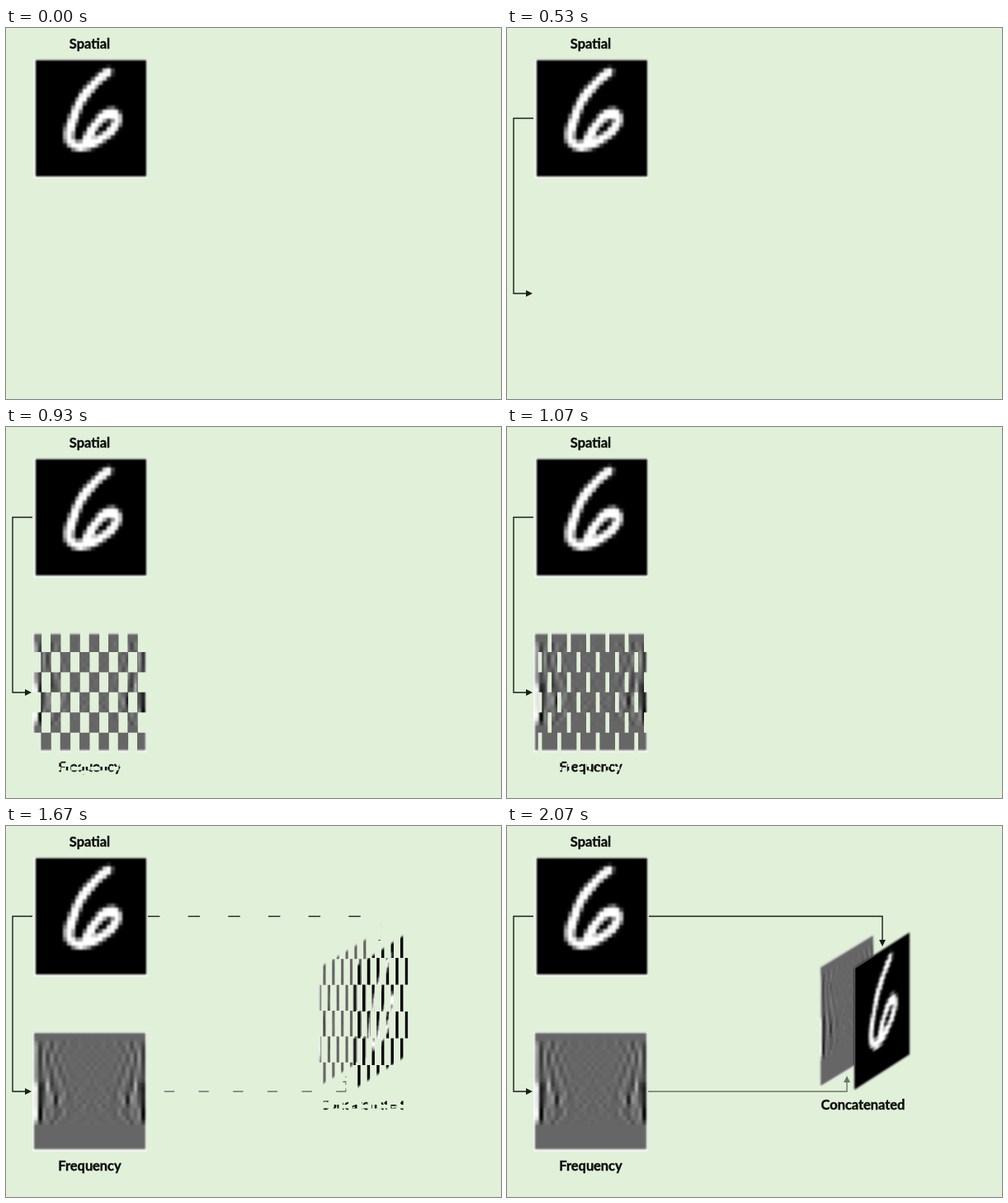
Recreate the animation shown at these times as an HTML page with a canvas. Size 600 px wide and 450 px high, loop 2540 ms.

```html
<!DOCTYPE html>
<html lang="en">
<head>
<meta charset="utf-8">
<title>Spatial and frequency channels</title>
<style>
  html, body { margin: 0; height: 100%; overflow: hidden; background: #e1f0d9; }
  canvas { display: block; width: 100vw; height: 100vh; filter: blur(0.6px); }
</style>
</head>
<body>
<canvas id="stage" width="600" height="450"></canvas>
<script>
const ctx = document.getElementById('stage').getContext('2d');
const LOOP = 2540, STEP = 1000 / 15, N = 28;
const DARK = '#1c1f1a', GREY = '#6c7569';

function makeTile() {
  const tile = document.createElement('canvas');
  tile.width = tile.height = N;
  return tile;
}

function makeDigit() {
  const tile = makeTile(), c = tile.getContext('2d');
  c.fillRect(0, 0, N, N);
  c.strokeStyle = '#fff';
  c.lineWidth = 2.3;
  c.lineCap = c.lineJoin = 'round';
  c.stroke(new Path2D('M18.3 2.9C14.5 5.5 11.5 9 10 13C8.2 17 7.6 19.8 9.8 20.5' +
    'C13 21.6 18.5 18.6 20.3 15.5C21.8 12.8 19 11.8 16.5 14C14 16.2 13.5 18 12.8 19.8'));
  return tile;
}

// Real part of the Fourier transform of each row of the digit.
function makeSpectrum(digit) {
  const tile = makeTile(), c = tile.getContext('2d');
  const input = digit.getContext('2d').getImageData(0, 0, N, N).data;
  const output = c.createImageData(N, N);
  for (let y = 0; y < N; y++) {
    for (let k = 0; k < N; k++) {
      let sum = 0;
      for (let x = 0; x < N; x++) {
        sum += input[(y * N + x) * 4] / 255 * Math.cos(2 * Math.PI * k * x / N);
      }
      const i = (y * N + k) * 4, level = 102 + 16 * sum;
      output.data.set([level, level, level, 255], i);
    }
  }
  c.putImageData(output, 0, 0);
  return tile;
}

const digit = makeDigit();
const spectrum = makeSpectrum(digit);

// A tile spanned by the edge (dx, dy) and a vertical edge of the given height.
function panel(tile, x, y, dx, dy, height, border) {
  ctx.save();
  ctx.transform(dx / 135, dy / 135, 0, height / 141, x, y);
  ctx.fillStyle = '#fafdf8';
  ctx.fillRect(-border, -border / 2, 135 + 1.75 * border, 141 + 1.75 * border);
  ctx.imageSmoothingEnabled = false;
  ctx.filter = 'blur(0.9px)';
  ctx.drawImage(tile, 0, 0, 135, 141);
  ctx.restore();
}

function label(text, x, y) {
  ctx.font = '700 16.4px Lato, sans-serif';
  ctx.textAlign = 'center';
  ctx.fillStyle = ctx.strokeStyle = '#0c0d0b';
  ctx.lineWidth = 0.4;
  ctx.fillText(text, x, y);
  ctx.strokeText(text, x, y);
}

// Elbow line whose last point is the tip of the arrowhead.
function arrow(points, color) {
  const [x, y] = points[points.length - 1];
  const [px, py] = points[points.length - 2];
  const length = Math.hypot(x - px, y - py);
  const ux = (x - px) / length, uy = (y - py) / length;
  const bx = x - 8 * ux, by = y - 8 * uy;
  ctx.strokeStyle = ctx.fillStyle = color;
  ctx.lineWidth = 1.4;
  ctx.beginPath();
  points.slice(0, -1).forEach(p => ctx.lineTo(...p));
  ctx.lineTo(bx, by);
  ctx.stroke();
  ctx.beginPath();
  ctx.moveTo(x, y);
  ctx.lineTo(bx - 4 * uy, by + 4 * ux);
  ctx.lineTo(bx + 4 * uy, by - 4 * ux);
  ctx.fill();
}

// Checkerboard reveal: six rows of six cells, each opening from left to right.
function reveal(progress, [x, y, width, height], draw) {
  if (progress <= 0) return;
  ctx.save();
  if (progress < 1) {
    const w = width / 6, h = height / 6;
    ctx.beginPath();
    for (let row = 0; row < 6; row++) {
      for (let col = -1; col < 6; col++) {
        ctx.rect(x + (col + row % 2 / 2) * w, y + row * h, progress * w, h);
      }
    }
    ctx.clip();
  }
  draw();
  ctx.restore();
}

// Start and length are in animation steps.
const groups = [
  { start: 1, length: 7, parts: [
    [[7, 108.5, 32, 222], () => arrow([[32, 109.5], [8, 109.5], [8, 322], [31, 322]], DARK)]
  ] },
  { start: 10, length: 7.5, parts: [
    [[30.7, 248.6, 140, 146.5], () => panel(spectrum, 34, 251, 135, 0, 141, 2)],
    [[31.5, 398.5, 140, 27], () => label('Frequency', 101.5, 418)]
  ] },
  { start: 22.78, length: 7.5, parts: [
    [[379, 130, 65, 188], () => panel(spectrum, 380, 171.5, 64, -39, 144, 1.5)],
    [[420.5, 127.5, 69, 195], () => panel(digit, 421, 172, 67, -43, 148, 0)],
    [[172, 108.4, 292, 45.6], () => arrow([[172, 109.5], [455, 109.5], [455, 146]], DARK)],
    [[171, 296, 250, 27], () => arrow([[171, 322], [412, 322], [412, 303]], GREY)],
    [[361.5, 324.5, 140, 27], () => label('Concatenated', 431.5, 344)]
  ] }
];

function render() {
  const step = Math.floor((performance.now() % LOOP + 3.4) / STEP);
  ctx.fillStyle = '#e1f0d9';
  ctx.fillRect(0, 0, 600, 450);
  label('Spatial', 101.5, 25);
  panel(digit, 35.5, 39, 134.5, 0, 141, 2);
  for (const { start, length, parts } of groups) {
    const progress = (step - start) / length;
    parts.forEach(([box, draw]) => reveal(progress, box, draw));
  }
  requestAnimationFrame(render);
}
render();
</script>
</body>
</html>
```
